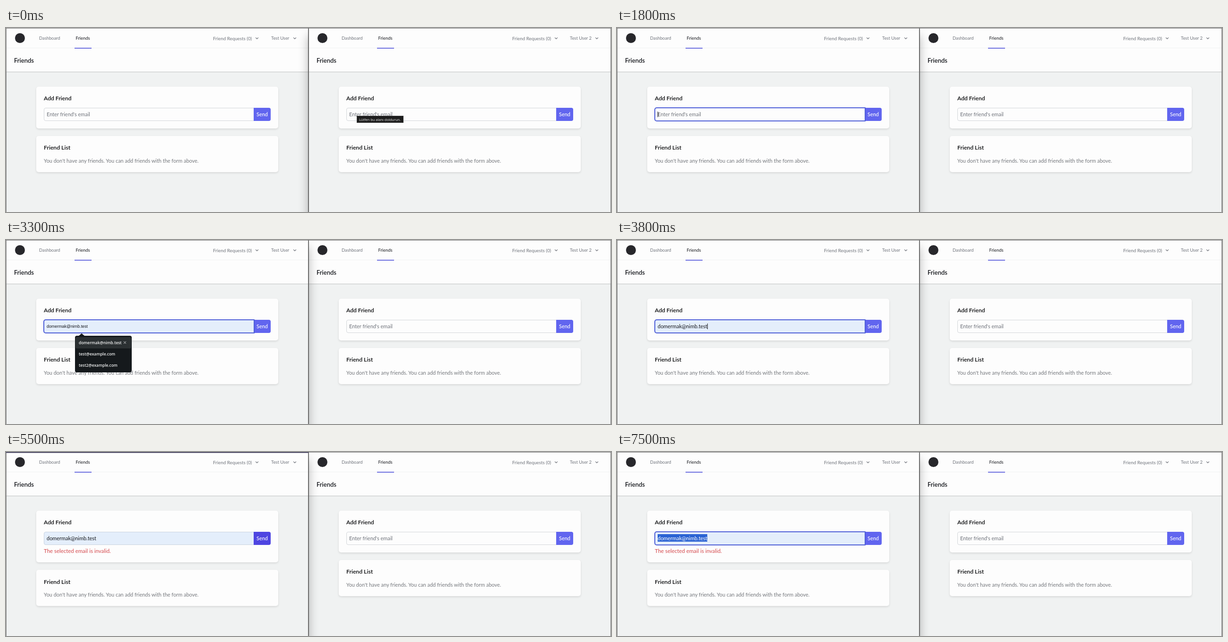
Recreate the animation shown at these times as an HTML page. Size 1280 px wide and 392 px high, loop 8000 ms.

```html
<!DOCTYPE html>
<html lang="en">
<head>
<meta charset="utf-8">
<title>Friend request form</title>
<style>
html, body { margin: 0; width: 100%; height: 100%; overflow: hidden; background: #f0f2f2; }
#stage { position: absolute; left: 0; top: 0; width: 1280px; height: 392px; overflow: hidden; font-family: Lato, sans-serif; }
#stage div, svg { position: absolute; box-sizing: border-box; }
.window { top: 0; width: 640px; height: 460px; background: #f0f2f2; }
.window.active { z-index: 1; box-shadow: 0 16px 20px rgba(0, 0, 0, .3); }
.frame { inset: 0; border: 1px solid #747474; }
.nav { width: 640px; height: 43px; background: #fdfdfd; border-bottom: 1px solid #f1f2f2; }
.header { top: 43px; width: 640px; height: 50px; background: #fdfdfd; box-shadow: 0 1px 1px rgba(0, 0, 0, .18); }
.logo { left: 19px; top: 11px; width: 21px; height: 21px; border-radius: 50%; background: #27272b; }
.underline { left: 145px; top: 42.4px; width: 36px; height: 1.4px; background: #6e70e0; }
.card { left: 64px; width: 512px; border-radius: 5px; background: #fdfdfd; box-shadow: 0 2px 4px rgba(0, 0, 0, .11); }
.add { top: 125px; height: 89px; }
.list { top: 230px; height: 77px; }
.input { left: 80px; top: 170px; width: 445px; height: 28px; border: 1px solid #d3d6da; border-radius: 4px 0 0 4px; background: #fdfdfd; }
.input.filled { background: #e4eefb; border-color: #c9d3e0; }
.input.focus { z-index: 1; border-color: #4f5fd8; box-shadow: 0 0 0 1px #4f5fd8; }
.send { left: 524px; top: 170px; width: 36px; height: 28px; border-radius: 0 4px 4px 0; background: #6165ef; }
.text { line-height: 0; white-space: pre; }
.value { z-index: 2; }
.value.preview { font: 8.89px/0 "Liberation Sans", Arial, sans-serif; }
.selected { padding: 1.5px 0; background: #2b63d3; color: #fff; }
.caret { position: absolute; top: -6px; width: 1px; height: 12px; background: #111; }
.progress { z-index: 3; left: 0; top: 0; height: 2px; background: #504d68; }
.menu { z-index: 3; left: 146px; top: 204px; width: 120px; height: 78px; border-radius: 4px; background: #15191c; font-family: "Open Sans", sans-serif; }
.arrow { left: 8px; top: -5px; border: solid transparent; border-width: 0 6px 5px; border-bottom-color: #15191c; }
.item { left: 1px; width: 118px; height: 24px; border-radius: 3px; }
.item.hover { background: #2b3032; }
.item svg { left: 101px; top: 8px; display: none; }
.item.hover svg { display: block; }
.tooltip { left: 742px; top: 187px; width: 99px; height: 15px; z-index: 4; background: #1d1d1d; border: 1px solid #3b3b3b; font-family: "Open Sans", sans-serif; }
</style>
</head>
<body>
<div id="stage"></div>
<script>
const EMAIL = 'domermak@nimb.test';
const SUGGESTIONS = [EMAIL, 'test@example.com', 'test2@example.com'];
const PLACEHOLDER = "Enter friend's email";
const ERROR = 'The selected email is invalid.';
const GRAY = '#6f737b', DARK = '#15171c';

// y is the vertical centre of the capitals
const text = (x, y, size, color, content, weight = 400, cls = '') =>
  `<div class="text ${cls}" style="left:${x}px;top:${y}px;font-size:${size}px;color:${color};font-weight:${weight}">${content}</div>`;

const chevron = x =>
  `<svg style="left:${x - 4}px;top:19px" width="8" height="6" fill="none" stroke="#666a72" stroke-width="1.2"><path d="M1.2 1.4L4 4.2L6.8 1.4"/></svg>`;

const page = (id, x, user, requestsX, requestsArrow, userX, userArrow) => `
  <div class="window" id="${id}" style="left:${x}px">
    <div class="header"></div><div class="nav"></div><div class="logo"></div><div class="underline"></div>
    ${text(70, 22, 9.35, GRAY, 'Dashboard')}
    ${text(147.5, 22, 9.35, DARK, 'Friends')}
    ${text(requestsX, 21.7, 9.8, GRAY, 'Friend Requests (0)')}${chevron(requestsArrow)}
    ${text(userX, 21.7, 9.4, GRAY, user)}${chevron(userArrow)}
    ${text(17, 68.5, 13, DARK, 'Friends', 600)}
    <div class="card add"></div>
    ${text(80, 150, 12.1, '#08090b', 'Add Friend', 600)}
    <div class="input"></div><div class="send"></div>
    ${text(86, 183.7, 10.95, GRAY, PLACEHOLDER, 400, 'value')}
    ${text(530, 183.8, 10.9, '#fff', 'Send', 500)}
    <div class="lower">
      <div class="card list"></div>
      ${text(80, 255.3, 12.2, '#08090b', 'Friend List', 600)}
      ${text(80, 283, 10.95, '#74777c', "You don't have any friends. You can add friends with the form above.")}
    </div>
    <div class="frame"></div>
  </div>`;

const item = (email, i) => `
  <div class="item" style="top:${3 + 24 * i}px">${text(7, 11.7, 8.4, '#f2f3f3', email, 600)}
    <svg width="7" height="7" stroke="#d5d7d8"><path d="M1 1L6 6M6 1L1 6"/></svg></div>`;

const stage = document.getElementById('stage');
stage.innerHTML =
  page('left', 0, 'Test User', 438, 531, 561, 611) +
  page('right', 640, 'Test User 2', 431, 524, 553, 610) +
  `<div class="tooltip">${text(4, 6.5, 7.45, '#eee', 'Lütfen bu alanı doldurun.')}</div>`;

const left = document.getElementById('left'), right = document.getElementById('right');
left.insertAdjacentHTML('beforeend', `
  ${text(80, 211, 11.45, '#d4474b', '<span></span><span class="selected"></span><span></span>', 400, 'error')}
  <div class="menu"><div class="arrow"></div>${SUGGESTIONS.map(item).join('')}</div>
  <div class="progress"></div>`);

const find = selector => left.querySelector(selector);
const value = find('.value'), input = find('.input'), send = find('.send'), error = find('.error');
const menu = find('.menu'), progress = find('.progress'), add = find('.add'), lower = find('.lower');
const items = [...left.querySelectorAll('.item')];
const tooltip = stage.querySelector('.tooltip');
value.innerHTML = '<span></span><span class="caret"></span>';
const [valueText, caret] = value.children;

const ramp = (t, from, to) => Math.min(1, Math.max(0, (t - from) / (to - from)));
const within = (t, from, to) => t >= from && t < to;

function draw(t) {
  tooltip.hidden = t >= 1300;
  left.classList.toggle('active', t >= 1800);
  right.classList.toggle('active', t < 1800);

  const hovered = !within(t, 2500, 3400) ? -1 : within(t, 2800, 3100) ? 1 : 0;
  menu.hidden = !within(t, 1900, 3400);
  items.forEach((el, i) => el.classList.toggle('hover', i === hovered));

  const filled = t >= 2500;
  input.classList.toggle('filled', filled);
  input.classList.toggle('focus', within(t, 1800, 4900) || t >= 7300);
  value.classList.toggle('preview', hovered >= 0);
  value.style.fontSize = hovered >= 0 ? '8.89px' : '10.95px';
  value.style.color = filled ? DARK : GRAY;
  valueText.textContent = !filled ? PLACEHOLDER : hovered >= 0 ? SUGGESTIONS[hovered] : EMAIL;
  valueText.className = t >= 7400 ? 'selected' : '';
  caret.hidden = !(within(t, 1800, 2300) || within(t, 3400, 4000) || within(t, 4500, 4900));
  caret.style.left = filled ? 'auto' : '0';

  const hover = ramp(t, 4150, 4300) - ramp(t, 5750, 5900);
  const mix = (a, b) => Math.round(a + (b - a) * hover);
  send.style.background = `rgb(${mix(97, 78)},${mix(101, 69)},${mix(239, 225)})`;

  progress.style.width = 640 * ramp(t, 5100, 5450) + 'px';
  progress.style.opacity = 1 - ramp(t, 5550, 5800);

  const failed = t >= 5400;
  error.hidden = !failed;
  add.style.height = (failed ? 110.3 : 89) + 'px';
  lower.style.top = (failed ? 21.3 : 0) + 'px';

  const end = t < 7300 ? Math.round(2 + 20 * ramp(t, 6300, 6800)) : 2;
  [ERROR.slice(0, 2), ERROR.slice(2, end), ERROR.slice(end)]
    .forEach((part, i) => { error.children[i].textContent = part; });
}

const start = performance.now();
function tick() {
  draw((performance.now() - start) % 8000);
  requestAnimationFrame(tick);
}
tick();
</script>
</body>
</html>
```
